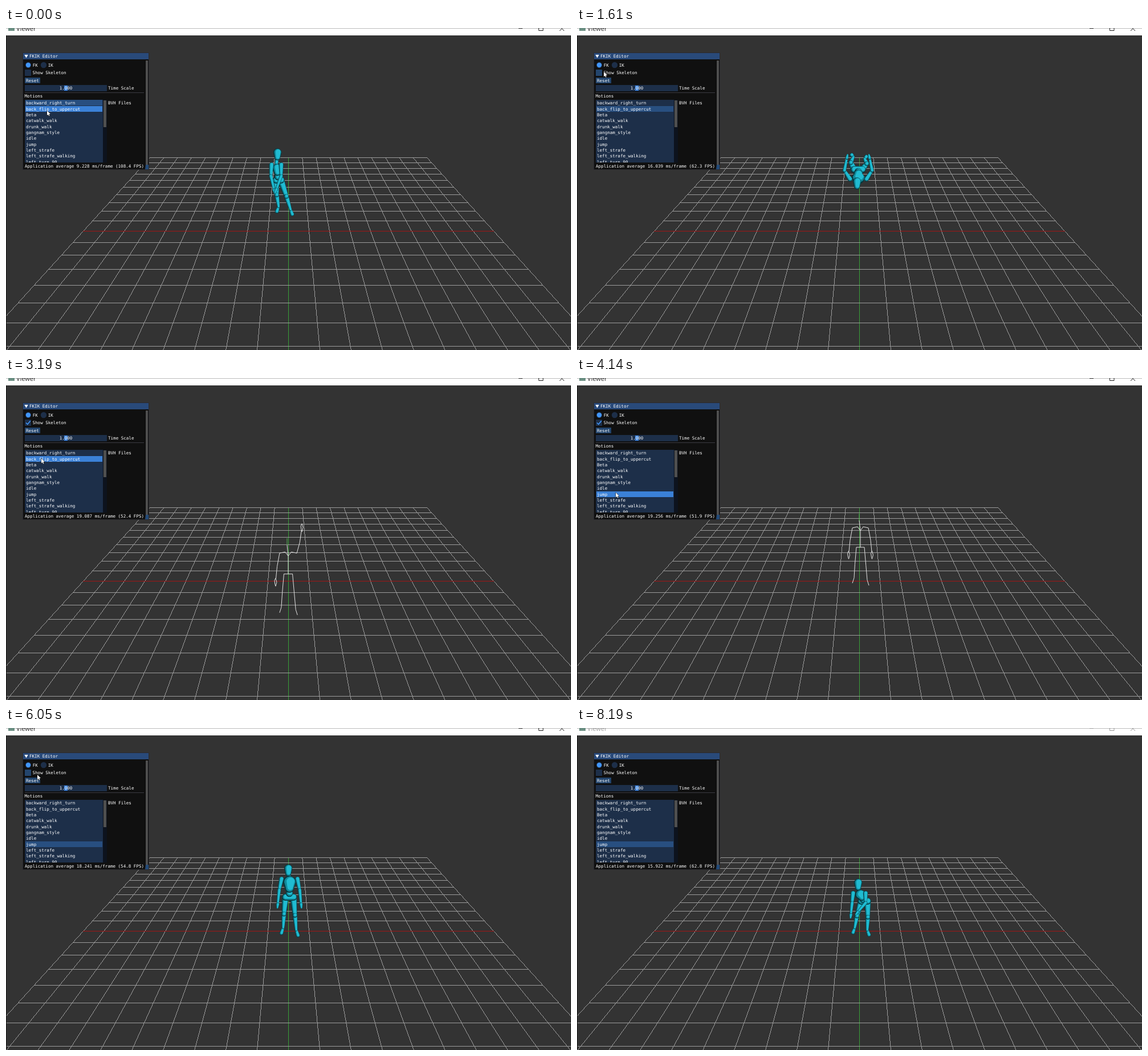
Recreate the animation shown at these times as an HTML page with a canvas. Size 991 px wide and 565 px high, loop 8210 ms.

```html
<!DOCTYPE html>
<html>
<head>
<meta charset="utf-8">
<style>
html, body { margin: 0; width: 100%; height: 100%; overflow: hidden; background: #333; }
canvas { display: block; }
</style>
</head>
<body>
<canvas id="stage" width="991" height="565"></canvas>
<script>
const ctx = document.getElementById('stage').getContext('2d');
const LOOP = 8210, FLIP_START = 120, JUMP_START = 4090, JUMP_LENGTH = 1910;
const FRAME = '#1d2f49', BUTTON = '#23456d', HOVER = '#3b81d7', SELECTED = '#284f80', GRAB = '#4f4f4f';
const MOTIONS = ['backward_right_turn', 'back_flip_to_uppercut', 'Beta', 'catwalk_walk', 'drunk_walk',
  'gangnam_style', 'idle', 'jump', 'left_strafe', 'left_strafe_walking', 'left_turn_90'];

const mix = (a, b, k) => a + (b - a) * k;
const mixPoint = (a, b, k) => [mix(a[0], b[0], k), mix(a[1], b[1], k)];
const smooth = k => k * k * (3 - 2 * k);

// keys: [time, object of numbers]; values hold outside the range
function sample(keys, t, ease = smooth) {
  const i = keys.findIndex(key => key[0] > t);
  if (i < 0) return keys[keys.length - 1][1];
  if (i === 0) return keys[0][1];
  const [t0, a] = keys[i - 1], [t1, b] = keys[i], k = ease((t - t0) / (t1 - t0));
  return Object.fromEntries(Object.keys(a).map(name => [name, mix(a[name], b[name], k)]));
}

// Body measures in pixels; arm angles run outward from straight down
const stand = { x: 497, ground: 360, size: 1, hip: 63, torso: 32, tilt: 0, head: 15, nod: -2, span: 14,
  footL: -14, footR: 15, stride: 4, arm: 1, upperL: .2, foreL: .1, upperR: .2, foreR: .1 };
const vary = (base, change) => ({ ...base, ...change });
const arms = (upper, fore) => ({ upperL: upper, foreL: fore, upperR: upper, foreR: fore });

const walk = vary(stand, { x: 478, ground: 322, hip: 55, torso: 27, tilt: -4, head: 18, nod: 2, span: 8.5,
  footL: -3, footR: 24, stride: 5, upperL: .05, foreL: -.22, upperR: 0, foreR: -.35 });
const crouch = vary(stand, { x: 493, ground: 348, hip: 61, torso: 29, head: 12, span: 14.5,
  footL: -11, footR: 14, stride: 3, arm: .88, ...arms(.65, -.38) });
const bent = vary(stand, { x: 488, ground: 304, hip: 41, torso: 0, head: -10, nod: 7, span: 15,
  footL: -18, footR: 10, stride: 0, arm: .72, upperL: 1.5, foreL: .6, upperR: .5, foreR: -.6 });
const leap = vary(stand, { x: 502, ground: 317, hip: 43, torso: 23, tilt: 4, head: 6, nod: 0,
  footL: -18, footR: 12, stride: 12, upperL: 1.6, foreL: 1.2, upperR: 1.2, foreR: .1 });
const squat = vary(stand, { x: 504, ground: 359, hip: 55, torso: 14, tilt: -9, head: 15, span: 11,
  footL: -20, footR: 8, arm: .85, upperL: .1, foreL: .1, upperR: 0, foreR: -.7 });
const ready = vary(stand, { ground: 364 });
const upright = vary(stand, { x: 494, ground: 318, size: .92 });
const punch = vary(upright, { ground: 372, size: 1, upperR: 2.9, foreR: 3 });
const forward = vary(stand, { x: 495, ground: 412, size: 1.08 });

const flipKeys = [[FLIP_START, ready], [650, ready], [1020, crouch], [1180, crouch],
  [1400, vary(stand, { x: 494, ground: 318, ...arms(2.9, 3) })],
  [1680, vary(crouch, { ground: 205, hip: -42, torso: -26, head: -12, ...arms(2.5, 3.4) })],
  [1960, vary(crouch, { ground: 300, hip: 32, torso: 14, head: 6 })],
  [2240, bent], [2380, bent], [2600, upright], [2900, punch],
  [3200, vary(forward, { upperR: 2.9, foreR: 3 })], [3600, forward]];
const jumpKeys = [[0, stand], [60, stand], [280, squat], [480, squat],
  [690, vary(leap, { x: 507, ground: 309, size: 1.1 })], [890, leap],
  [1180, squat], [1300, squat], [1650, stand]];

function pose(t) {
  if (t < FLIP_START) return walk;
  if (t < JUMP_START) return sample(flipKeys, t);
  return sample(jumpKeys, (t - JUMP_START) % JUMP_LENGTH);
}

const cursorKeys = [[0, 72,145], [1100, 72,145], [1500, 47,77], [2900, 48,77], [3320, 66,160],
  [3700, 68,201], [4450, 68,201], [5000, 54,93], [5150, 52,79], [6050, 55,82], [6300, 57,83],
  [6690, 531,306], [6890, 544,313], [7540, 932,549]].map(([t, x, y]) => [t, { x, y }]);
const timingKeys = [[0, 9.228], [1020, 13.344], [2240, 18.917], [4140, 19.256],
  [6050, 18.241], [6890, 16.137], [8190, 15.922]].map(([t, ms]) => [t, { ms }]);

function rect(x, y, w, h, color) {
  ctx.fillStyle = color;
  ctx.fillRect(x, y, w, h);
}
function shape(points, color) {
  ctx.beginPath();
  points.forEach(p => ctx.lineTo(...p));
  ctx.fillStyle = color;
  ctx.fill();
}
function line(points, color, width = 1) {
  ctx.beginPath();
  points.forEach(p => ctx.lineTo(...p));
  ctx.strokeStyle = color;
  ctx.lineWidth = width;
  ctx.stroke();
}
function disc(x, y, r, color) {
  ctx.beginPath();
  ctx.arc(x, y, r, 0, 7);
  ctx.fillStyle = color;
  ctx.fill();
}
function text(s, x, y, color = '#fff') {
  ctx.fillStyle = color;
  ctx.fillText(s, x, y);
}

// Perspective floor without smoothing: one pixel per line and row
function drawGrid() {
  const cx = 495, depth = 20.74, horizon = -40.6, gray = '#9c9c9c';
  const rowAt = z => Math.round(8225.5 / (depth - z) + horizon);
  const pitchAt = y => 36 * (y - horizon) / 396.6;
  for (let y = rowAt(-10); y < 565; y++)
    for (let i = -10; i <= 10; i++)
      rect(Math.round(cx + i * pitchAt(y)), y, 1, 1, i ? gray : '#38a038');
  for (let z = -10; z <= 7; z++) {
    const y = rowAt(z), half = Math.round(10 * pitchAt(y));
    rect(cx - half, y, 2 * half + 1, 1, z ? gray : '#a31414');
  }
}

function joints(p) {
  const s = p.size, pelvis = [p.x, p.ground - p.hip * s];
  const neck = [p.x + p.tilt * s, pelvis[1] - p.torso * s];
  const head = [neck[0] + p.nod, neck[1] - p.head * s];
  const swing = ([x, y], angle, length, side) =>
    [x + side * Math.sin(angle) * length * p.arm * s, y + Math.cos(angle) * length * p.arm * s];
  const sides = [-1, 1].map(side => {
    const left = side < 0;
    const shoulder = [neck[0] + side * p.span * s, neck[1]];
    const elbow = swing(shoulder, left ? p.upperL : p.upperR, 20, side);
    const hand = swing(elbow, left ? p.foreL : p.foreR, 25, side);
    const hip = [p.x + side * p.span * s * .5, pelvis[1]];
    const toe = [p.x + (left ? p.footL : p.footR) * s, p.ground + (left ? 0 : p.stride)];
    const ankle = [toe[0] - side * 3, toe[1] - p.hip * .15];
    const slack = Math.max(0, 56 * s - Math.hypot(ankle[0] - hip[0], ankle[1] - hip[1]));
    const middle = mixPoint(hip, ankle, .55);
    const knee = [middle[0] + side * slack * .15, middle[1]];
    return { shoulder, elbow, hand, hip, knee, ankle, toe };
  });
  return { pelvis, neck, head, sides, span: p.span * s };
}

// Rounded, tapered body part with light from the upper right
function limb(a, b, ra, rb = ra) {
  const angle = Math.atan2(b[1] - a[1], b[0] - a[0]), q = Math.PI / 2;
  for (const [color, size, shift] of [['#06383f', 1, 0], ['#12899a', .84, .08], ['#20bcd2', .6, .18]]) {
    ctx.beginPath();
    for (const [p, r, from] of [[a, ra, angle + q], [b, rb, angle - q]])
      ctx.arc(p[0] + r * shift, p[1] - r * shift, r * size, from, from + 2 * q);
    ctx.fillStyle = color;
    ctx.fill();
  }
}

function drawBody({ pelvis, neck, head, sides, span }) {
  for (const s of sides) {
    limb(s.ankle, s.toe, 2.3, 3.3);
    limb(mixPoint(s.knee, s.ankle, .15), s.ankle, 4, 2.3);
    limb(s.hip, s.knee, 6, 3.8);
    limb(s.knee, s.knee, 4);
  }
  limb(sides[0].hip, sides[1].hip, 6);
  const waist = mixPoint(neck, pelvis, .78);
  limb(waist, waist, 6.3);
  limb(neck, head, 3.2);
  limb(mixPoint(neck, pelvis, .2), mixPoint(neck, pelvis, .5), Math.max(7, span * .84), Math.max(6, span * .58));
  for (const s of sides) {
    limb(s.shoulder, s.elbow, 4.2, 2.7);
    limb(s.elbow, s.hand, 3.2, 2);
    limb(s.hand, mixPoint(s.elbow, s.hand, 1.25), 2.9, 1.5);
  }
  const [x, y] = head;
  limb([x, y - 3.5], [x, y + 5], 7.2, 5.2);
}

function drawSkeleton({ pelvis, neck, head: [hx, hy], sides }) {
  const white = '#e4e4e4', base = [neck[0], neck[1] + 3];
  line([pelvis, base, [hx, hy]], white);
  line([[hx, hy], [hx, hy - 12]], '#58b058');
  for (const s of sides) {
    const collar = mixPoint(neck, s.shoulder, .35), [x, y] = s.hand;
    line([base, [collar[0], collar[1] - 4], [s.shoulder[0], s.shoulder[1] - 2], s.elbow, mixPoint(s.elbow, s.hand, .8)], white);
    line([pelvis, s.hip, s.knee, s.ankle, s.toe], white);
    line([[x, y - 6], [x - 2, y - 2], [x - 1, y + 5], [x, y + 8], [x + 2, y + 1], [x, y - 6]], white);
  }
}

function drawTitleBar(active) {
  const ink = active ? '#222' : '#999';
  rect(0, 0, 991, 13, '#fff');
  rect(0, 0, 991, 1, '#bbb');
  rect(0, 13, 1, 552, '#1c1c1c');
  rect(4, 0, 11, 5, '#6b8f83');
  ctx.font = '11px "Open Sans", sans-serif';
  text('Viewer', 18, 5, ink);
  rect(899, 0, 7, 1, ink);
  line([[934.5, 0], [934.5, 4.5], [942, 4.5], [942, 0]], ink);
  line([[971, 5], [975, 1], [979, 5]], ink);
}

function drawPanel(t, mouse, skeleton) {
  const over = (x, y, w, h) => mouse.x >= x && mouse.x < x + w && mouse.y >= y && mouse.y < y + h;
  rect(29, 43, 222, 206, '#2b2b30');
  rect(30, 44, 220, 204, '#101010');
  rect(30, 44, 220, 11, '#294a7a');
  shape([[32.3, 47], [38.7, 47], [35.5, 52.4]], '#fff');
  ctx.font = '7.55px "DejaVu Sans Mono", monospace';
  text('FKIK Editor', 41, 52);

  rect(244, 56, 6, 184, '#0a0a0a');
  rect(245, 57, 4, 183, GRAB);
  shape([[250, 240], [250, 248], [244, 248], [245, 240]], '#234a78');

  for (const [x, label, on] of [[39, 'FK', true], [66, 'IK', false]]) {
    disc(x, 65, 5.2, FRAME);
    if (on) disc(x, 65, 4.2, '#4296fa');
    text(label, x + 7.7, 67.6);
  }

  rect(33, 73, 11, 11, over(33, 72, 72, 12) ? BUTTON : FRAME);
  if (skeleton) line([[35, 78.5], [37.7, 81.2], [42.7, 75.3]], '#4296fa', 1.6);
  text('Show Skeleton', 46.5, 81.2);

  rect(33, 87, 27, 10, over(33, 86, 27, 11) ? '#4296fa' : BUTTON);
  text('Reset', 35, 94.7);

  rect(33, 100, 144, 11, over(33, 100, 144, 11) ? BUTTON : FRAME);
  rect(102, 101, 6, 9, '#3d85e0');
  text('1.000', 93.7, 108.2);
  text('Time Scale', 179, 108.2);
  rect(33, 113, 209, 1, '#3a3a42');
  text('Motions', 32.5, 122.2);

  rect(33, 126, 144, 110, FRAME);
  rect(170, 126, 7, 110, '#0d131e');
  rect(171, 127, 5, 47, GRAB);
  const selected = t < FLIP_START ? 0 : t < JUMP_START ? 1 : 7;
  ctx.save();
  ctx.beginPath();
  ctx.rect(33, 126, 137, 110);
  ctx.clip();
  MOTIONS.forEach((name, i) => {
    const y = 126.3 + i * 10.36, hot = over(34, y, 135, 10.36);
    if (hot || i === selected) rect(34, Math.round(y), 135, 10, hot ? HOVER : SELECTED);
    text(name, 35, y + 7.9);
  });
  ctx.restore();
  text('BVH Files', 179, 134.2);

  const { ms } = sample(timingKeys, t, k => k);
  text(`Application average ${ms.toFixed(3)} ms/frame (${(1000 / ms).toFixed(1)} FPS)`, 33, 245);
}

function drawCursor({ x, y }) {
  const arrow = [[0, 0], [0, 8.6], [2, 6.8], [3.3, 9.6], [4.6, 9], [3.4, 6.2], [6, 6], [0, 0]]
    .map(([a, b]) => [x + a, y + b]);
  line(arrow, '#000');
  shape(arrow, '#fff');
}

function draw() {
  const t = Math.floor(performance.now() % LOOP / 10) * 10;
  const cursor = sample(cursorKeys, t), body = joints(pose(t));
  const skeleton = t >= 2750 && t < 5450;
  ctx.textRendering = 'geometricPrecision';
  rect(0, 0, 991, 565, '#333');
  drawGrid();
  (skeleton ? drawSkeleton : drawBody)(body);
  drawTitleBar(t < 7650);
  drawPanel(t, cursor, skeleton);
  if (t < 7560) drawCursor(cursor);
  requestAnimationFrame(draw);
}
draw();
</script>
</body>
</html>
```
